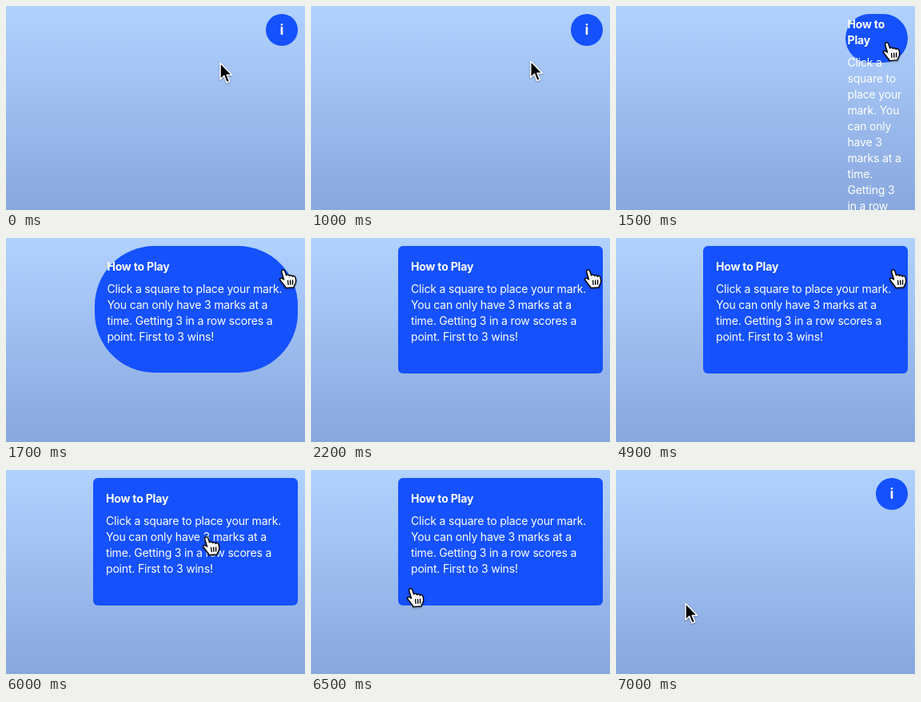
Animation, 374 px wide and 256 px high, one loop 7100 ms. Source, as an HTML page:

```html
<!DOCTYPE html>
<html lang="en">
<head>
<meta charset="utf-8">
<title>How to Play</title>
<style>
  html, body { margin: 0; width: 100%; height: 100%; overflow: hidden; }
  body {
    position: relative;
    background: linear-gradient(#b1d2ff, #88a7de);
    font: 14px/20px Inter, "Open Sans", sans-serif;
    letter-spacing: -.18px;
    color: #fff;
  }
  #panel {
    position: absolute; top: 10px; right: 9px;
    box-sizing: border-box;
    background: #1551fd;
  }
  #panel h1 { margin: 0 0 8px; font: inherit; font-weight: 700; }
  #panel p { margin: 0; }
  #icon {
    position: absolute; inset: 0;
    display: flex; align-items: center; justify-content: center;
    font-size: 18px; font-weight: 700; letter-spacing: 0;
  }
  #cursor {
    position: absolute; left: 0; top: 0; overflow: visible;
    filter: drop-shadow(0 1px 1px #0005);
  }
  [hidden] { display: none !important; }
</style>
</head>
<body>
<div id="panel">
  <div id="text">
    <h1>How to Play</h1>
    <p>Click a square to place your mark. You can only have 3 marks at a time. Getting 3 in a row scores a point. First to 3 wins!</p>
  </div>
  <div id="icon">i</div>
</div>
<svg id="cursor" width="24" height="28" stroke-linejoin="round" stroke-linecap="round">
  <path id="arrow" stroke="#fff" stroke-width="1.5"
    d="M1 1.5V22L5.8 17.5 9 26 12.6 24.5 9.2 16.5H15.5Z"/>
  <g id="hand" transform="translate(-5 -2)" stroke="#000" stroke-width="1.4">
    <path fill="#fff" d="M5 2C3.2 2.6 3.6 4.2 4 5.6L6.6 14.2C5 13 2.6 11.6 1.5 13.2C.8 14.6 4.6 17.6 6 20C7 22 8.6 22.6 9 24.6L19 24C19 22 21.4 20 21.6 17C21.8 14 21 10 19.5 9.6C18.4 9.2 17.6 9.8 17.4 10.6C17 8.6 14 8.2 13.4 9.6C13 7.8 10.2 7.6 9.6 9L7.8 3.6C7.2 2 6 1.6 5 2Z"/>
    <path fill="none" d="M11.6 15.5l.5 5M14.6 15.2l.3 5M17.6 15l0 5"/>
  </g>
</svg>
<script>
const LOOP = 7100, STEP = 100, ENTER = 1433, LEAVE = 6560, DURATION = 300;

// time, x, y of the pointer's hot spot
const path = [
  [0, 267, 70], [300, 267, 70], [600, 240, 79], [700, 240, 79],
  [1100, 285, 64], [1500, 338, 46], [1700, 346, 40], [5200, 346, 40],
  [6000, 250, 84], [6500, 124, 149], [6700, 86, 166], [LOOP, 86, 166]
];

const $ = id => document.getElementById(id);
const panel = $('panel');
const mix = (a, b, k) => a + (b - a) * k;

// cubic-bezier(.4, 0, .2, 1)
function ease(x) {
  x = Math.min(1, Math.max(0, x));
  let lo = 0, hi = 1;
  for (let i = 0; i < 24; i++) {
    const s = (lo + hi) / 2, r = 1 - s;
    if (3 * r * r * s * .4 + 3 * r * s * s * .2 + s ** 3 < x) lo = s;
    else hi = s;
  }
  return 3 * (1 - lo) * lo * lo + lo ** 3;
}

function pointerAt(t) {
  const i = path.findIndex(point => point[0] > t);
  const [t0, x0, y0] = path[i - 1], [t1, x1, y1] = path[i];
  const k = (t - t0) / (t1 - t0);
  return [mix(x0, x1, k), mix(y0, y1, k)];
}

function draw(now) {
  const t = Math.floor(now % LOOP / STEP) * STEP;
  const inside = t >= ENTER && t < LEAVE;
  const open = ease((t - ENTER) / DURATION) - ease((t - LEAVE) / DURATION);

  panel.style.width = mix(40, 256, open) + 'px';
  panel.style.height = mix(40, 160, open) + 'px';
  panel.style.padding = 16 * open + 'px';
  panel.style.borderRadius = mix(9999, 6, open) + 'px';
  $('text').hidden = !inside;
  $('icon').hidden = inside;

  const [x, y] = pointerAt(t);
  $('cursor').style.transform = `translate(${x}px, ${y}px)`;
  $('arrow').style.display = inside ? 'none' : '';
  $('hand').style.display = inside ? '' : 'none';
}

const start = performance.now();
function tick() {
  draw(performance.now() - start);
  requestAnimationFrame(tick);
}
tick();
</script>
</body>
</html>
```
